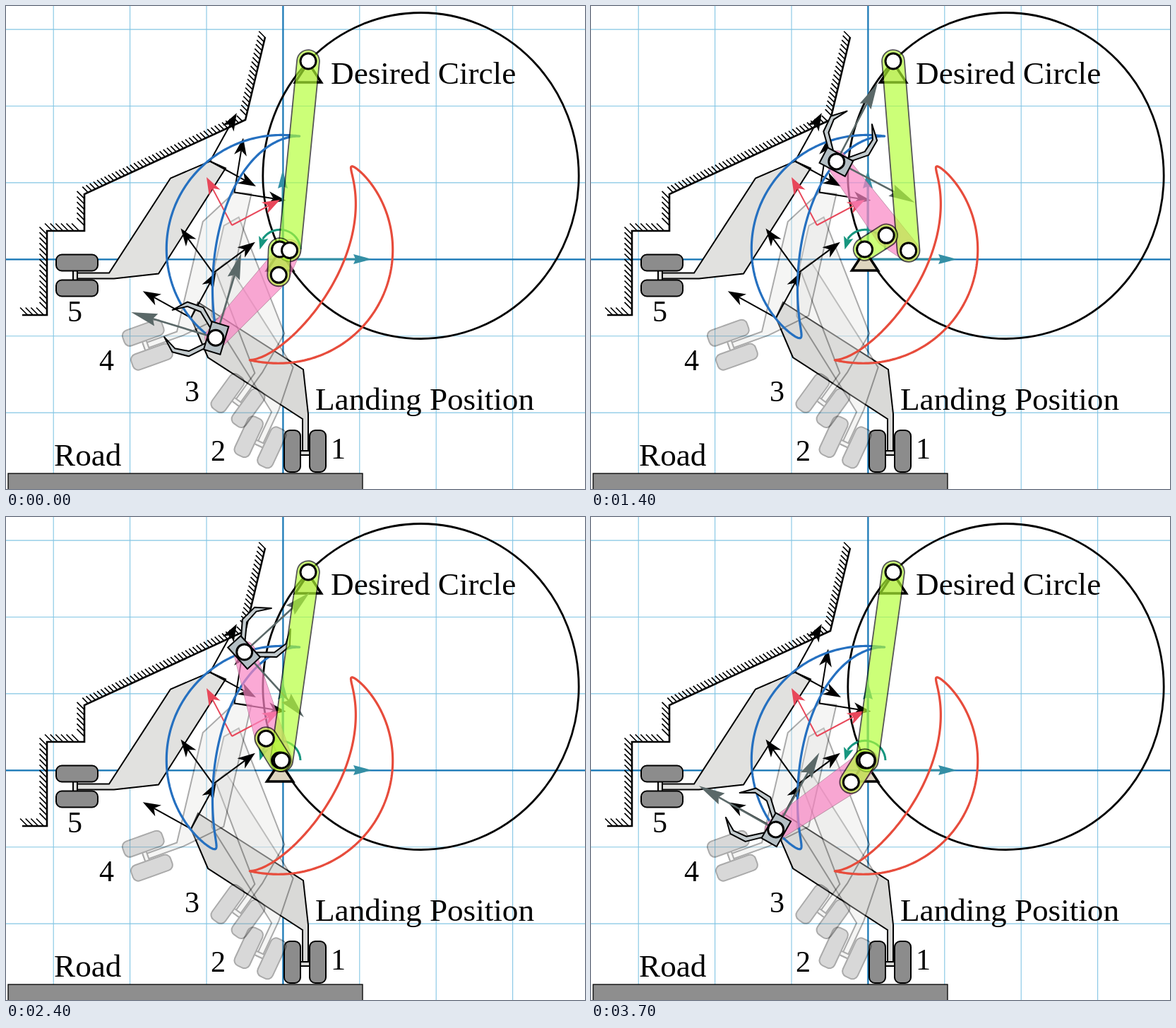
Animation, 820 px wide and 683 px high, one loop 3800 ms. Source, as an HTML page:

```html
<!DOCTYPE html>
<html lang="en">
<head>
<meta charset="utf-8">
<title>Landing gear linkage</title>
<style>
  html, body { margin: 0; width: 100%; height: 100%; overflow: hidden; background: #fff; }
  svg { display: block; width: 820px; height: 683px; }
  path, polyline { fill: none; }
  text { font: 45.2px "Liberation Serif", "Noto Serif", serif; }
  .num { font-size: 42px; }
  .ghost { opacity: .33; }
</style>
</head>
<body>
<svg viewBox="0 0 820 683">
  <defs>
    <g id="gear" stroke="#000" stroke-width="2">
      <polygon points="-151.5,-213 -2.5,-118 4.5,-55 4.5,3 -3.5,3 -3.5,-48 -137.5,-135 -161.5,-191"/>
      <rect x="-7" y="-3" width="14" height="6"/>
      <rect x="-29.5" y="-32" width="23" height="59" rx="8" fill="#8c8c8c"/>
      <rect x="6.5" y="-32" width="23" height="59" rx="8" fill="#8c8c8c"/>
    </g>
    <polygon id="finger" points="10,10 31,29 51,31 70,20 53,37 29,36 10,18"
      fill="#c3cbce" stroke="#000" stroke-width="2" stroke-linejoin="round"/>
    <circle id="pin" r="11" fill="#fff" stroke="#000" stroke-width="3"/>
    <path id="base" d="M0 2L-18.5 30H18.5Z" style="fill:#dfd6c0" stroke="#000" stroke-width="3.5"/>
  </defs>
  <g id="grid"></g>
  <g id="scene"></g>
  <g id="labels">
    <text x="460" y="110">Desired Circle</text>
    <text x="438" y="571">Landing Position</text>
    <text x="68" y="650">Road</text>
    <text class="num" x="460" y="640">1</text>
    <text class="num" x="290" y="643">2</text>
    <text class="num" x="253" y="559">3</text>
    <text class="num" x="132" y="515">4</text>
    <text class="num" x="87" y="446">5</text>
  </g>
  <g id="curves" stroke-width="3.2" stroke-linejoin="round"></g>
  <g id="linkage"></g>
</svg>
<script>
const A = [387.6, 344], B = [428, 78];
const CRANK = 36.4, COUPLER = 38.1, ROCKER = 268.8, REACH = 126;
const RAD = Math.PI / 180;
const put = (id, markup) => document.getElementById(id).innerHTML = markup;
const polar = ([x, y], deg, r) => [x + r * Math.cos(deg * RAD), y + r * Math.sin(deg * RAD)];

function arrow(x, y, deg, len, color, [head, half, notch], width = 2) {
  return `<g transform="translate(${x} ${y}) rotate(${deg})">
    <path d="M0 0H${len - head + notch}" stroke="${color}" stroke-width="${width}"/>
    <path d="M${len} 0l${-head} ${-half}l${notch} ${half}l${-notch} ${half}z" style="fill:${color}"/></g>`;
}

// Four-bar linkage: side = 1 or -1 picks the assembly branch
function solve(deg, side) {
  const C = polar(A, deg, CRANK);
  const dx = B[0] - C[0], dy = B[1] - C[1], d = Math.hypot(dx, dy);
  const open = Math.acos((COUPLER ** 2 + d * d - ROCKER ** 2) / (2 * COUPLER * d)) / RAD;
  const turn = Math.atan2(dy, dx) / RAD + side * open;
  return { C, D: polar(C, turn, COUPLER), P: polar(C, turn + 201.4, REACH), aim: turn + 263.1 };
}

function couplerCurve(side, color) {
  const pts = Array.from({ length: 240 }, (_, i) => solve(i * 1.5, side).P);
  return `<path d="M${pts.join('L')}Z" stroke="${color}"/>`;
}

// Diagonal hatching in a band of constant depth behind the wall
function hatchedWall() {
  const wall = [[23, 437], [58, 437], [58, 318], [111, 318], [111, 266], [339, 161], [367, 44]];
  const gap = 7.6, depth = 10.5;
  let ticks = '';
  for (let i = 1; i < wall.length; i++) {
    const [x, y] = wall[i - 1], dx = wall[i][0] - x, dy = wall[i][1] - y;
    const len = Math.hypot(dx, dy), ux = dx / len, uy = dy / len, slant = ux - uy;
    for (let s = gap / slant; s <= len; s += gap / slant)
      ticks += `M${x + ux * s} ${y + uy * s}l${-depth / slant} ${-depth / slant}`;
  }
  return `<path d="${ticks}" stroke="#000" stroke-width="1.7"/>
    <polyline points="${wall.join(' ')}" stroke="#000" stroke-width="2.6"/>`;
}

function drawStatic() {
  let grid = '';
  for (let i = -3; i <= 3; i++)
    grid += `M${392.4 + 108.4 * i} 0v683M0 ${358.3 + 108.4 * i}h820`;
  put('grid', `<path d="${grid}" stroke="#83c5e4" stroke-width="1.1"/>
    <path d="M392.4 0v683M0 358.3h820" stroke="#1676b5" stroke-width="2.2"/>`);

  const gears = [[423.5, 632, 0], [98, 381, 90], [359, 619, 25], [327, 560, 36], [198, 480, 70.3]];
  const black = [25, 9, 7], teal = [26, 7, 3];
  let scene = `<ellipse cx="587.5" cy="240" rx="223.7" ry="230.5" fill="none" stroke="#000" stroke-width="2.8"/>
    <rect x="3" y="661" width="502" height="30" fill="#8e8e8e" stroke="#000" stroke-width="1.3"/>` + hatchedWall();
  gears.forEach(([x, y, r], i) => scene += `<use href="#gear" class="${i > 1 ? 'ghost' : ''}"
    fill="${i ? '#e1e1df' : '#d9d9d7'}" transform="translate(${x} ${y}) rotate(${r})"/>`);
  gears.forEach(([x, y, r], i) => {
    if (i === 3) return;
    scene += `<g transform="translate(${x} ${y}) rotate(${r})">` +
      arrow(-161.5, -191, -61.4, 74, '#000', black) +
      arrow(-161.5, -191, 209, 78, '#000', black) + '</g>';
  });
  scene += [-27.9, 242.1].map(a => arrow(320, 310, a, 77, '#e8475a', black)).join('');
  scene += [0, -90].map(a => arrow(392, 358, a, 126, '#348fa5', teal, 3)).join('');
  scene += '<path d="M417 344A29 29 0 0 0 364 329" stroke="#17967f" stroke-width="3"/>' +
    arrow(365, 326, 107, 19, '#17967f', [18, 7, 4]);
  scene += `<use href="#base" x="388" y="344"/><use href="#base" x="428" y="78"/>`;
  put('scene', scene);
  put('curves', couplerCurve(1, '#2570c0') + couplerCurve(-1, '#e74c3c'));
}

function body(points, opacity, edge, fill, edgeWidth) {
  const shape = (color, w) => `<polygon points="${points.join(' ')}" fill="${color}"
    stroke="${color}" stroke-width="${w}" stroke-linejoin="round" stroke-linecap="round"/>`;
  return `<g opacity="${opacity}">${shape(edge, 30 + 2 * edgeWidth)}${shape(fill, 30)}</g>`;
}
const link = (a, b) => body([a, b], .66, '#000', '#b3ff34', 1.8);
const pin = ([x, y]) => `<use href="#pin" x="${x}" y="${y}"/>`;

function drawLinkage(step) {
  const { C, D, P, aim } = solve(92.2 - 8.925 * step, 1);
  const arrows = [0, 90].map(a => arrow(...P, aim + a, 125, '#5a6868', [37, 9, 5], 2.6)).join('');
  const gripper = `<g transform="translate(${P}) rotate(${aim})">
    <use href="#finger"/><use href="#finger" transform="scale(1 -1)"/>
    <rect x="-13" y="-20.5" width="24.5" height="41" fill="#b4bfc4" stroke="#000" stroke-width="2"/></g>`;
  put('linkage', body([C, D, P], .7, '#a06080', '#fa86c4', .7) + arrows + gripper + pin(P) +
    link(B, D) + link(A, C) + [B, A, C, D].map(pin).join(''));
}

drawStatic();
let shown = -1;
function tick() {
  const step = Math.floor(performance.now() / 100) % 38;
  if (step !== shown) drawLinkage(shown = step);
  requestAnimationFrame(tick);
}
tick();
</script>
</body>
</html>
```
